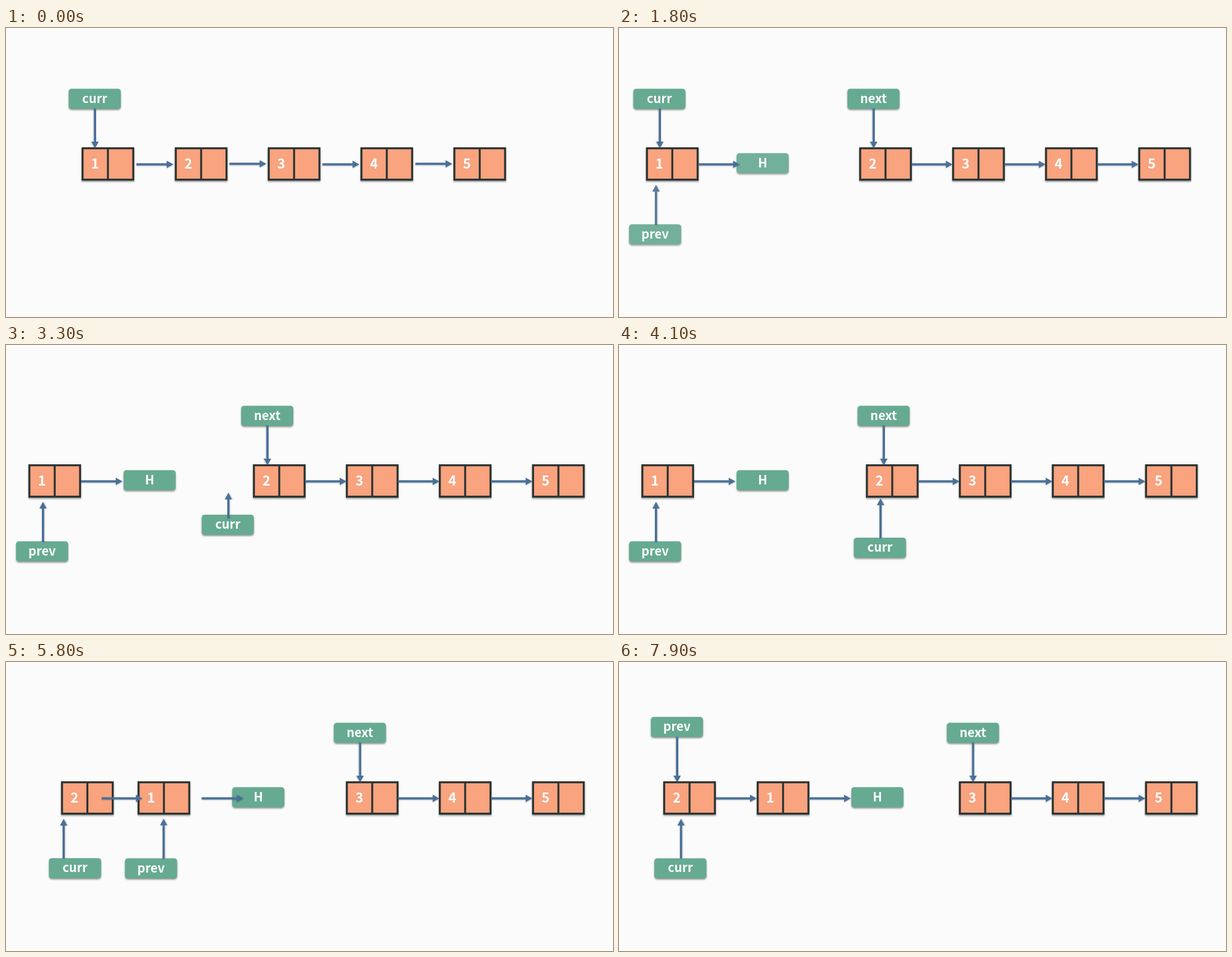
These frames come from a looping animation (1084 by 516 pixels, 8 s). An HTML page:

```html
<!DOCTYPE html>
<html lang="en">
<head>
<meta charset="utf-8">
<title>Reversing a linked list</title>
<style>
  html, body { margin: 0; width: 100%; height: 100%; overflow: hidden; background: #fbfbfb; }
  svg { display: block; width: 100%; height: 100%; }
  text {
    font: 700 22px "Noto Sans CJK JP", "Noto Sans CJK SC", "Noto Sans CJK", "Noto Sans", sans-serif;
    fill: #fff;
    text-anchor: middle;
  }
  .node text { font-size: 24px; }
  .node path { fill: #f9a37f; stroke: #2b3432; stroke-width: 3.5; }
  .label rect { fill: #66aa92; }
  .node, .label { filter: drop-shadow(0 2px 1.5px rgba(0, 0, 0, .42)); }
  .arrow { filter: drop-shadow(0 1px 1px rgba(0, 0, 0, .25)); }
  .arrow line { stroke: #4a7099; stroke-width: 4; }
  .arrow path { fill: #4a7099; }
</style>
</head>
<body>
<svg id="stage" viewBox="0 0 1084 516"></svg>
<script>
const LOOP = 8000, TICK = 100, MOVE = 800;

// Start time of each move
const SHOW_NEXT = 560, SPLIT = 1283, CURR_ON = 2880, NEXT_ON = 4057,
      RELINK = 5229, PREV_ON = 6580, CURR_ON2 = 7883;

const stage = document.getElementById("stage");
const parts = [];

function add(tag, parent, attrs = {}, text = "") {
  const el = document.createElementNS("http://www.w3.org/2000/svg", tag);
  for (const key in attrs) el.setAttribute(key, attrs[key]);
  el.textContent = text;
  return parent.appendChild(el);
}

function place(el, [x, y]) {
  el.setAttribute("transform", `translate(${x} ${y})`);
}

// Each key is [start, ...values]; a part whose first key starts late fades in.
function node(text, ...keys) {
  const el = add("g", stage, { class: "node" });
  add("path", el, { d: "M1.75 1.75H92.25V57.75H1.75ZM47 1.75V57.75" });
  add("text", el, { x: 24, y: 37.5 }, text);
  parts.push({ el, keys: keys.map(([at, x]) => [at, x, 213]), draw: place });
}

function label(text, ...keys) {
  const el = add("g", stage, { class: "label" });
  add("rect", el, { width: 93, height: 36, rx: 5 });
  add("text", el, { x: 46.5, y: 25 }, text);
  parts.push({ el, keys, draw: place });
}

function arrow(keys) {
  const el = add("g", stage, { class: "arrow" });
  const line = add("line", el);
  const head = add("path", el, { d: "M0 0L-12 -6.5V6.5Z" });
  function draw(_, [x1, y1, x2, y2]) {
    const dx = x2 - x1, dy = y2 - y1, len = Math.hypot(dx, dy);
    const size = Math.min(1, len / 12);
    const turn = Math.atan2(dy, dx) * 180 / Math.PI;
    el.setAttribute("transform", `translate(${x2} ${y2}) rotate(${turn})`);
    line.setAttribute("x1", -len);
    line.setAttribute("x2", -11 * size);
    head.setAttribute("transform", `scale(${size})`);
  }
  parts.push({ el, keys, draw });
}

const across = (...keys) => arrow(keys.map(([at, x1, x2, y = 243.5]) => [at, x1, y, x2, y]));
const upright = (...keys) => arrow(keys.map(([at, x, y1, y2]) => [at, x, y1, x, y2]));

node("1", [0, 135], [SPLIT, 40], [RELINK, 246]);
node("2", [0, 301.5], [SPLIT, 441], [RELINK, 79]);
node("3", [0, 467.5], [SPLIT, 607]);
node("4", [0, 633], [SPLIT, 773]);
node("5", [0, 799], [SPLIT, 939.5]);

label("H", [SPLIT, 210, 223.5], [RELINK, 415, 223.5]);
label("curr", [0, 112, 108.5], [SPLIT, 17.5, 108.5], [CURR_ON, 419.5, 344],
  [RELINK, 57.5, 350.5], [CURR_ON2, 585.5, 344]);
label("next", [SHOW_NEXT, 280, 108.5], [SPLIT, 420, 108.5], [NEXT_ON, 585.5, 108.5]);
label("prev", [SPLIT, 18, 350.5], [RELINK, 223.5, 350.5], [PREV_ON, 57, 98]);

across([0, 233, 299], [SPLIT, 134, 208], [RELINK, 173, 246]);
across([0, 399, 465, 242.5], [SPLIT, 534, 608], [RELINK, 339, 414]);
across([0, 565, 631], [SPLIT, 700, 774]);
across([0, 731, 797, 242.5], [SPLIT, 866, 940]);

upright([0, 159, 144, 215], [SPLIT, 65, 144, 215], [CURR_ON, 467, 345, 274],
  [RELINK, 271, 352, 280], [PREV_ON, 104, 134, 215]);
upright([SHOW_NEXT, 326.5, 144, 215], [SPLIT, 467, 144, 215], [NEXT_ON, 632.5, 144, 215]);
upright([SPLIT, 66, 352, 280], [RELINK, 105, 351, 280], [CURR_ON2, 633, 345, 274]);

// cubic-bezier(.25, .1, .25, 1)
function ease(x) {
  if (x <= 0) return 0;
  if (x >= 1) return 1;
  const curve = (s, a, b) => 3 * a * s * (1 - s) ** 2 + 3 * b * s * s * (1 - s) + s ** 3;
  let lo = 0, hi = 1;
  for (let i = 0; i < 24; i++) {
    const mid = (lo + hi) / 2;
    if (curve(mid, .25, .25) < x) lo = mid; else hi = mid;
  }
  return curve(lo, .1, 1);
}

function render(time) {
  for (const { el, keys, draw } of parts) {
    let i = keys.length - 1;
    while (i > 0 && keys[i][0] > time) i--;
    const [start, ...to] = keys[i];
    const from = keys[Math.max(0, i - 1)].slice(1);
    const p = ease((time - start) / MOVE);
    draw(el, to.map((v, k) => from[k] + (v - from[k]) * p));
    el.setAttribute("opacity", i === 0 && start > 0 ? p : 1);
  }
}

let origin;
function frame(now) {
  origin ??= now;
  const time = (now - origin) % LOOP;
  render(Math.floor(time / TICK) * TICK);
  requestAnimationFrame(frame);
}
render(0);
requestAnimationFrame(frame);
</script>
</body>
</html>
```
